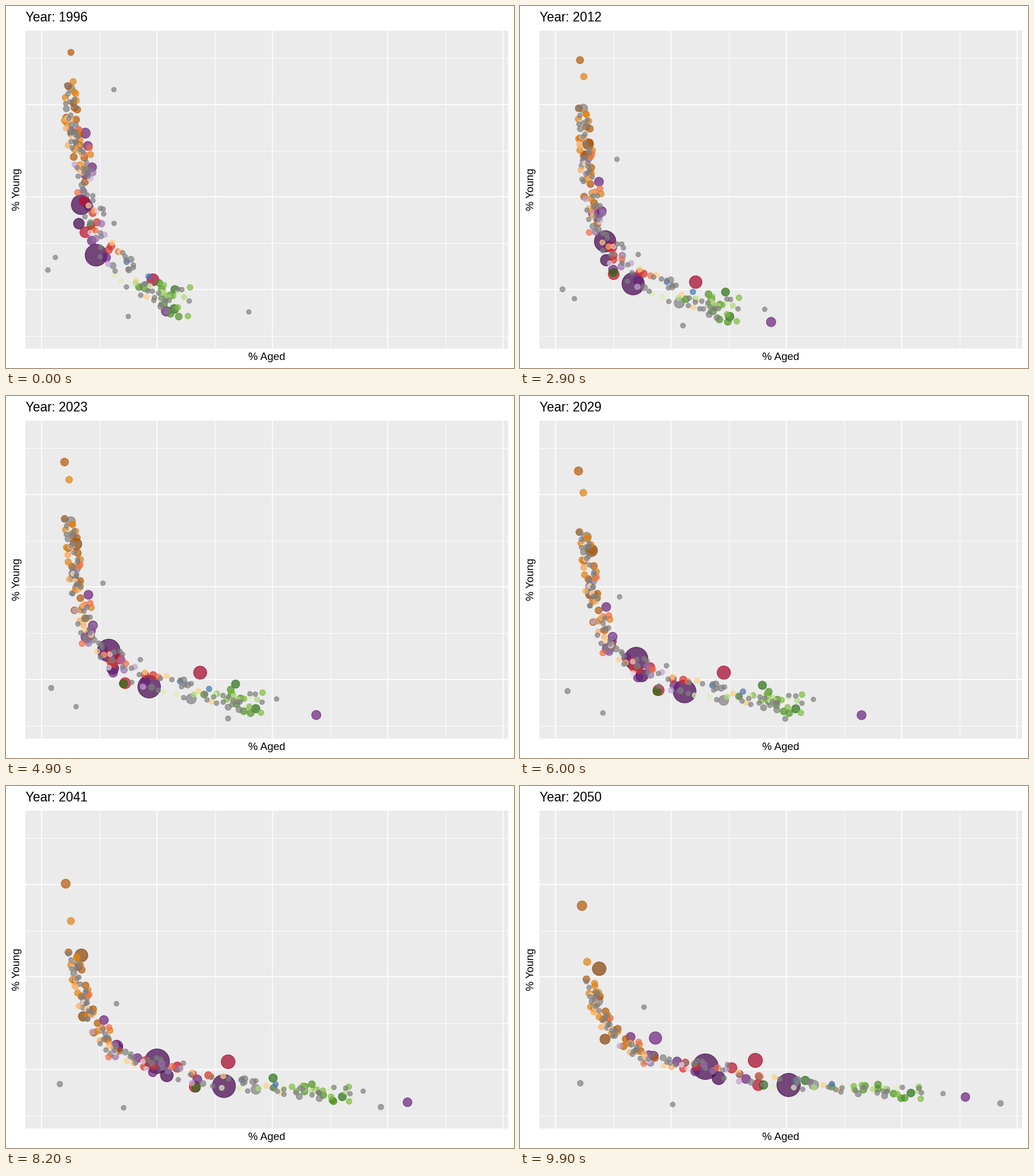
Animation of 885 by 632 pixels, one loop 10 s. Source, as a matplotlib script:

```python
import numpy as np
import matplotlib.pyplot as plt
from matplotlib.animation import FuncAnimation
from matplotlib.colors import to_rgba
from matplotlib.patches import Rectangle

W, H, DPI = 885, 632, 64
PT = 72 / DPI                       # points per pixel
FRAMES, FIRST, LAST = 100, 1996, 2050
STROKE, ALPHA = 1.1, 0.7

rng = np.random.default_rng(8)
t = np.linspace(0, 1, FRAMES)

GREY = "#7f7f7f"
PLUM, PURPLE, MAUVE, LILAC, PALE = "#40004b", "#6a1f7a", "#9970ab", "#c2a5cf", "#e2cfe6"
CRIMSON, RED, SCARLET, SALMON = "#a50026", "#bd0a26", "#d73027", "#f46d43"
BROWN, RUST, ORANGE, PEACH, SAND, CREAM = (
    "#854004", "#b35806", "#e08214", "#fdae61", "#fdd084", "#fee0b6")
FOREST, GREEN, LEAF, LIME, MINT = "#276f12", "#4d9221", "#7fbc41", "#b0dc7c", "#daf0b8"
BLUE = "#4575b4"


def arc(a, b, c):
    """Parabola in time through a (start), b (middle) and c (end)."""
    return a * (1 - t) * (1 - 2 * t) + 4 * b * t * (1 - t) + c * t * (2 * t - 1)


# The curve the crowd follows, from young (top left) to aged (bottom right)
U = np.linspace(0, 1, 8)
CURVES = np.array([
    [(116, 140), (113, 195), (124, 240), (138, 290),
     (160, 390), (200, 460), (262, 505), (310, 520)],
    [(109, 215), (117, 262), (125, 335), (140, 410),
     (195, 470), (290, 510), (385, 528), (440, 538)],
    [(122, 335), (135, 385), (165, 430), (215, 475),
     (310, 490), (460, 521), (590, 528), (700, 538)],
])

dots = []                           # (x, y, radius, colour)


def lead(color, r0, r1, start, middle, end):
    """A dot that stands out, with its own path and growth."""
    x, y = (arc(*p) for p in zip(start, middle, end))
    dots.append((x, y, r0 + (r1 - r0) * t, color))


def crowd(color, count, r, lo, hi):
    """Dots spread along the stretch lo..hi of the moving curve."""
    for k in range(count):
        u = lo + (hi - lo) * (k + rng.random()) / count
        x, y = (arc(*(np.interp(u, U, c[:, i]) for c in CURVES)) for i in (0, 1))
        dx, dy = rng.uniform(-1, 1, 2) * (9 + 20 * u, 20 + 10 * u)
        dots.append((x + dx, y + dy * (1 - 0.6 * t), np.full(FRAMES, r), color))


lead(PLUM, 19.7, 21, (157, 435), (251, 508), (468, 522))
lead(PLUM, 17.8, 23, (131, 347), (180, 445), (323, 490))
lead(CRIMSON, 11, 13, (256, 478), (339, 483), (410, 479))
lead(PLUM, 10, 12, (127, 380), (187, 476), (346, 510))
lead(PURPLE, 9.5, 11.5, (138, 222), (141, 422), (236, 440))
lead(PURPLE, 9, 8.2, (279, 533), (543, 557), (776, 543))
lead(RED, 10, 10.4, (138, 395), (209, 502), (415, 522))
lead(RED, 9, 9.6, (136, 341), (199, 460), (369, 492))
lead(BROWN, 9, 12.5, (117, 223), (122, 259), (138, 319))
lead(BROWN, 6.5, 9.4, (117, 169), (118, 318), (148, 442))
lead(RUST, 6, 9, (113, 81), (102, 116), (108, 209))
lead(ORANGE, 6, 7, (117, 132), (110, 147), (117, 307))
lead(FOREST, 7.5, 8.3, (148, 383), (206, 503), (424, 522))
lead(FOREST, 8.4, 7.4, (293, 529), (437, 546), (681, 536))
lead(FOREST, 7.5, 8, (294, 495), (401, 503), (497, 514))
lead(GREY, 9.7, 9, (243, 490), (324, 529), (512, 522))
lead(GREY, 7.5, 10, (113, 144), (113, 220), (135, 375))
lead(GREY, 4.6, 4.6, (423, 534), (473, 529), (737, 537))
lead(GREY, 4.8, 5.6, (73, 461), (79, 510), (105, 519))
lead(GREY, 4.6, 4.8, (86, 439), (123, 543), (266, 556))
lead(GREY, 4.6, 4.8, (188, 146), (169, 328), (216, 386))
lead(GREY, 4.6, 5.6, (213, 542), (390, 563), (837, 554))

crowd(PURPLE, 6, 8.4, 0.3, 0.7)
crowd(SCARLET, 5, 7, 0.5, 0.7)
crowd(RUST, 12, 6.7, 0, 0.48)
crowd(MAUVE, 7, 6.5, 0.15, 0.65)
crowd(GREEN, 8, 6.6, 0.8, 1)
crowd(ORANGE, 13, 6.1, 0, 0.4)
crowd(GREY, 12, 6, 0.1, 0.95)
crowd(SALMON, 6, 5.8, 0.15, 0.75)
crowd(LEAF, 7, 5.6, 0.8, 1)
crowd(PEACH, 9, 5.5, 0.08, 0.5)
crowd(LILAC, 4, 5.4, 0.3, 0.75)
crowd(BLUE, 2, 5.4, 0.72, 0.8)
crowd(SAND, 6, 5.2, 0.4, 0.9)
crowd(LIME, 5, 5.2, 0.75, 1)
crowd(MINT, 5, 5, 0.68, 1)
crowd(PALE, 3, 5, 0.4, 0.6)
crowd(CREAM, 4, 4.9, 0.05, 0.3)
crowd(GREY, 62, 4.7, 0.03, 1)

dots.sort(key=lambda d: -d[2].mean())
X, Y, R = (np.array([d[k] for d in dots]) for k in range(3))
colors = [to_rgba(d[3], ALPHA) for d in dots]
SIZES = ((2 * R - STROKE) * PT) ** 2

fig = plt.figure(figsize=(W / DPI, H / DPI), dpi=DPI, facecolor="white")
ax = fig.add_axes((0, 0, 1, 1))
ax.set(xlim=(0, W), ylim=(H, 0))
ax.axis("off")

# panel and grid: minor lines lie halfway between the major ones
L, T, RIGHT, B = 33.5, 42.5, 875, 598
GX, GY = 201, 161.5
ax.add_patch(Rectangle((L, T), RIGHT - L, B - T, fc="#ebebeb", ec="none", zorder=0))
for lw, x0, y0 in ((0.9, 62.3 + GX / 2, 91), (1.6, 62.3, 171.7)):
    style = dict(color="white", lw=lw * PT, zorder=1)
    ax.vlines(np.arange(x0, RIGHT, GX), T, B, **style)
    ax.hlines(np.arange(y0, B, GY), L, RIGHT, **style)


def label(x, y, text, size, **kw):
    return ax.text(x, y, text, size=size * PT, family="Liberation Sans",
                   color="black", va="baseline", rotation_mode="anchor", **kw)


title = label(33.5, 27, "", 22.5)
label(454, 617.5, "% Aged", 18.8, ha="center")
label(24.5, 320, "% Young", 18.8, ha="center", rotation=90)

cloud = ax.scatter(X[:, 0], Y[:, 0], s=SIZES[:, 0], facecolors=colors,
                   edgecolors=colors, linewidths=STROKE * PT, zorder=3)


def update(i):
    title.set_text(f"Year: {round(FIRST + (LAST - FIRST) * t[i])}")
    cloud.set_offsets(np.column_stack((X[:, i], Y[:, i])))
    cloud.set_sizes(SIZES[:, i])
    return cloud, title


anim = FuncAnimation(fig, update, frames=FRAMES, interval=100,
                     repeat=True, repeat_delay=0, blit=False)
plt.show()
```
